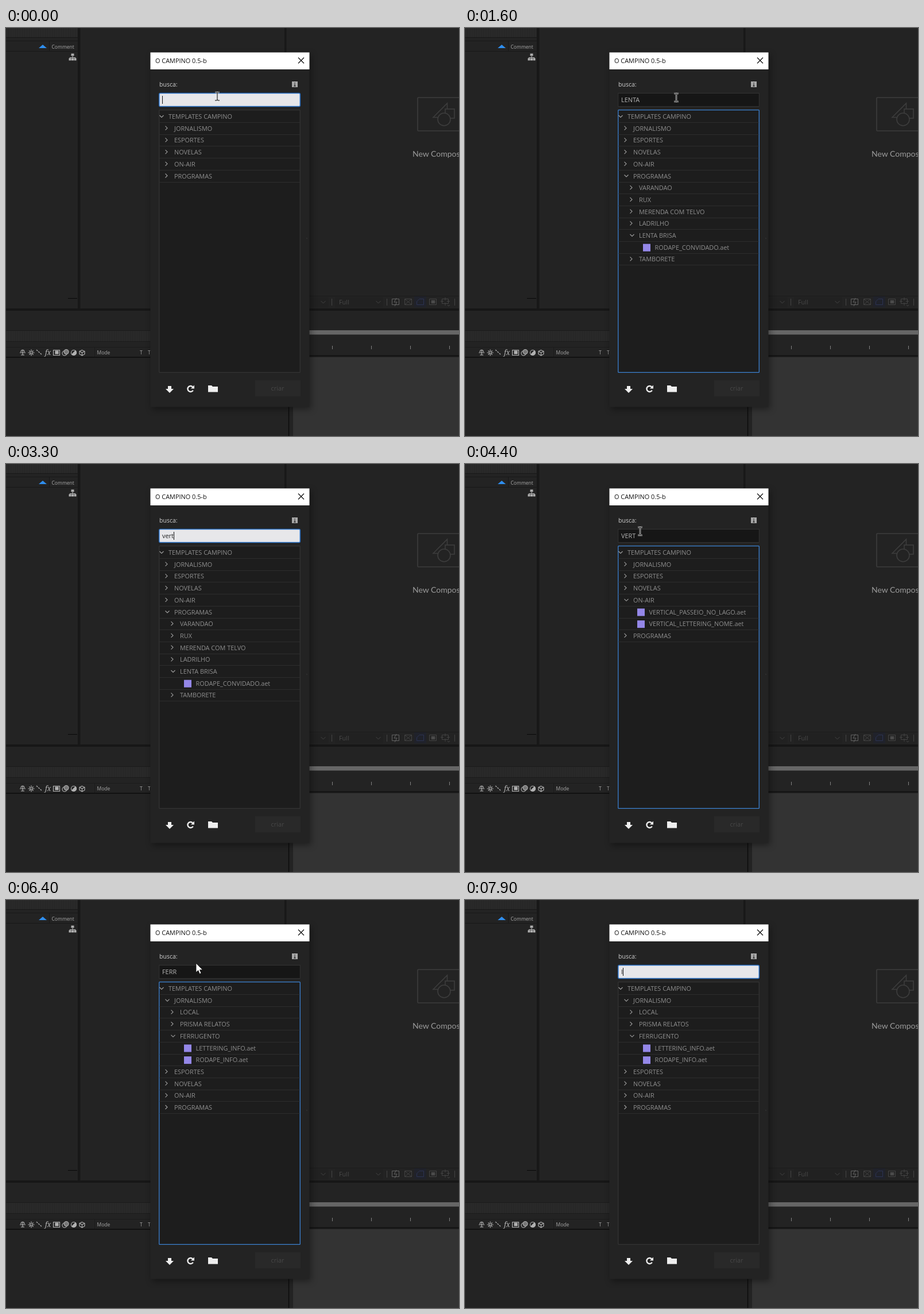
Animation of 789x710 px, one loop 8 s. Source, as an HTML page:

```html
<!DOCTYPE html>
<html lang="pt">
<head>
<meta charset="utf-8">
<title>Busca de templates</title>
<style>
  html, body { margin: 0; width: 100%; height: 100%; overflow: hidden; background: #232323; }
  svg { display: block; width: 789px; height: 710px; }
  text { font: 10.9px "Open Sans", "Noto Sans", sans-serif; white-space: pre; }
  .small { font-size: 8.5px; fill: #a8a8a8; }
  .line { fill: none; stroke: #b4b4b4; stroke-width: 1.15; }
  .dim { fill: none; stroke: #434343; }
  .ghost { fill: #232323; stroke: #3d3d3d; stroke-width: 1.6; }
  .dialog { filter: drop-shadow(3px 4px 6px rgba(0, 0, 0, .38)); }
  #rows text { fill: #8e8e8e; }
  #rows path { fill: none; stroke: #a0a0a0; stroke-width: 1.1; }
  #rows line { stroke: #2d2d2d; }
</style>
</head>
<body>
<svg viewBox="0 0 789 710">
  <defs>
    <pattern id="stripes" width="4" height="4" patternUnits="userSpaceOnUse">
      <rect width="4" height="4" fill="#292929"/><rect width="1" height="4" fill="#262626"/>
    </pattern>
    <path id="beam" d="M-4-7h3l1 1 1-1h3M0-6V6M-4 7h3l1-1 1 1h3"/>
  </defs>
  <rect width="789" height="710" fill="#232323"/>

  <!-- upper panels -->
  <rect width="125" height="16" fill="url(#stripes)"/>
  <path d="M0 16.5H125M0 22.5H125M0 40.5H125M75.5 23V40" stroke="#181818"/>
  <path d="M57 35L64 29L71 35Z" fill="#2f8eee"/>
  <text class="small" x="79.5" y="35.5">Comment</text>
  <path class="line" d="M116 49V52M111.5 53V51.5H120.5V53"/>
  <path d="M113.5 44.5h5v4h-5zM109.5 52.5h4v4h-4zM114 52.5h4v4h-4zM118.5 52.5h4v4h-4z" fill="#b0b0b0"/>
  <path d="M108 470.5H124" stroke="#080808"/>
  <rect x="125" width="4.5" height="488" fill="#181818"/>
  <rect x="485" width="3.5" height="488" fill="#181818"/>
  <rect y="488" width="789" height="4" fill="#171717"/>

  <!-- viewer placeholder and footer -->
  <g class="ghost">
    <rect x="717" y="121" width="90" height="58" rx="1"/>
    <path d="M744 155.5L768.5 131V155.5Z"/>
    <rect x="765" y="141" width="16" height="16"/>
    <circle cx="763" cy="159" r="11"/>
  </g>
  <text x="708" y="224" fill="#9a9a9a" style="font:14px Lato,sans-serif">New Composition</text>
  <path d="M529 466.5H789" stroke="#1b1b1b"/>
  <rect x="529" y="468" width="33" height="18" fill="#212121"/>
  <rect x="573" y="468" width="84" height="18" fill="#212121"/>
  <text x="580" y="481" fill="#484848">Full</text>
  <rect x="711" y="467" width="21" height="19" fill="#20222b"/>
  <g class="dim">
    <path d="M548.5 475l4 4 4-4M644.5 475l4 4 4-4M567.5 471v12M663.5 471v12M781.5 471v12"/>
    <path d="M672.5 471.5h12v10h-12zM680 470l-4 7h5l-4 7" stroke="#626262"/>
    <path d="M694.5 471.5h12v10h-12zM695 472l11 9M706 472l-11 9"/>
    <path d="M715.5 481.5V476L720 471.5H727.5V481.5Z" stroke="#2c3352"/>
    <path d="M737.5 471.5h12v10h-12z"/><path d="M741 474h6v5h-6z" fill="#4c4c4c"/>
    <path d="M759.5 471.5h11v8h-11zM757 475.5h5M768 475.5h5M765 469v5M765 478v5M769 482l2 2 2-2"/>
  </g>

  <!-- timeline -->
  <rect y="527" width="493" height="18" fill="url(#stripes)"/>
  <path d="M0 526.5H493M0 545.5H493M0 555.5H493M154.5 556V573" stroke="#1b1b1b"/>
  <path d="M0 573H493" stroke="#121212" stroke-width="2"/>
  <g class="line">
    <path d="M24 565h10M26 564c0-5 6-5 6 0M29 560v9M26 569h6"/>
    <circle cx="44" cy="565" r="2"/>
    <path d="M44 559.5v2.5M44 568v2.5M38.5 565h2.5M47 565h2.5M40.5 561.5l1.5 1.5M46 567l1.5 1.5M47.5 561.5l-1.5 1.5M42 567l-1.5 1.5"/>
    <path d="M53 560l10 9" stroke-dasharray="3 1.5"/>
    <path d="M82.5 560.5h11v9h-11z"/><path d="M86 562h5v5h-5z" fill="#b0b0b0"/>
    <circle cx="102" cy="566" r="4"/><circle cx="105" cy="563.5" r="4" fill="#777"/>
    <circle cx="118" cy="565" r="4.5"/><path d="M121 561.5a4.5 4.5 0 0 1-6.3 6.5z" fill="#b0b0b0"/>
    <path d="M132.5 560.5l4.5 2v5l-4.5 2.5-4.5-2.5v-5zM128 562.5l4.5 2.5 4.5-2.5M132.5 565v5"/>
  </g>
  <text x="68" y="569" fill="#b8b8b8" style="font:italic 12px 'Noto Serif',serif">fx</text>
  <text class="small" x="158.5" y="568">Mode</text>
  <text class="small" x="233" y="568">T</text><text class="small" x="247" y="568">T</text>
  <rect x="500" y="573" width="289" height="137" fill="#333"/>
  <path d="M492.5 492V710" stroke="#0c0c0c" stroke-width="1.5"/>
  <rect x="500" y="526" width="289" height="7.5" fill="#666"/>
  <path d="M500 570.5H789" stroke="#121212" stroke-width="2"/>
  <path d="M568.5 553v6M636.5 553v6M704.5 553v6M772.5 553v6" stroke="#808080"/>

  <!-- dialog -->
  <rect class="dialog" x="251.5" y="42.5" width="277" height="617" fill="#232323"/>
  <rect x="251.5" y="42.5" width="277" height="29.5" fill="#fff"/>
  <text x="260" y="61" fill="#111">O CAMPINO 0.5-b</text>
  <path d="M509 51.5l10 10M519 51.5l-10 10" stroke="#111" stroke-width="1.2"/>
  <text x="267" y="101.5" fill="#d0d0d0" style="font-size:10.5px">busca:</text>
  <rect x="498" y="93" width="10" height="10" fill="#a8a8a8"/>
  <path d="M503 95v1.5M503 97.5v4M501.5 101.2h3" stroke="#222" stroke-width="1.3"/>
  <circle cx="524" cy="366" r=".7" fill="#444"/>

  <rect id="field" x="266.8" y="113.5" width="245.5" height="23"/>
  <rect id="pick" x="272" y="118" height="14" fill="#2f70c4"/>
  <text id="query" x="272" y="129"></text>
  <rect id="caret" y="118" width="1" height="14" fill="#111"/>
  <rect id="tree" x="266.8" y="142.6" width="245.5" height="456.8" rx="1" fill="#1d1d1d" stroke-width="1.3"/>
  <g id="rows"></g>

  <path d="M282 623h6v5h4l-7 7-7-7h4z" fill="#eee"/>
  <path d="M325.5 625a5 5 0 1 0 .3 5.5" fill="none" stroke="#eee" stroke-width="2.4"/>
  <path d="M328 621.5v6h-6z" fill="#eee"/>
  <path d="M352 622h6l2 2h9v9.5h-17z" fill="#eee"/>
  <rect x="434" y="613" width="79" height="28" fill="#292929"/>
  <text x="461.5" y="631" fill="#484848">criar</text>

  <g id="ibeam" fill="none">
    <use href="#beam" stroke="#d8d8d8" stroke-width="2.6"/>
    <use href="#beam" stroke="#111"/>
  </g>
  <path id="arrow" d="M0 0V16L3.8 12.5L6.3 18.5L9 17.4L6.5 11.6H11.5Z" fill="#fff" stroke="#111" stroke-width=".8"/>
</svg>
<script>
const LOOP = 8000, STEP = 100, ROW = 20.7;
const el = id => document.getElementById(id);
const show = (node, on) => node.style.display = on ? '' : 'none';

// Row marks: "-" open folder, "+" closed folder, "*" file
const groups = ['JORNALISMO', 'ESPORTES', 'NOVELAS', 'ON-AIR', 'PROGRAMAS'];
const buildTree = (opened, children = []) => [
  [0, '-', 'TEMPLATES CAMPINO'],
  ...groups.flatMap(name => name === opened
    ? [[1, '-', name], ...children]
    : [[1, '+', name]])
];
const trees = {
  empty: [],
  closed: buildTree(),
  shows: buildTree('PROGRAMAS', [
    [2, '+', 'VARANDAO'], [2, '+', 'RUX'], [2, '+', 'MERENDA COM TELVO'],
    [2, '+', 'LADRILHO'], [2, '-', 'LENTA BRISA'],
    [3, '*', 'RODAPE_CONVIDADO.aet'], [2, '+', 'TAMBORETE']
  ]),
  onAir: buildTree('ON-AIR', [
    [2, '*', 'VERTICAL_PASSEIO_NO_LAGO.aet'], [2, '*', 'VERTICAL_LETTERING_NOME.aet']
  ]),
  news: buildTree('JORNALISMO', [
    [2, '+', 'LOCAL'], [2, '+', 'PRISMA RELATOS'], [2, '-', 'FERRUGENTO'],
    [3, '*', 'LETTERING_INFO.aet'], [3, '*', 'RODAPE_INFO.aet']
  ])
};

const treeSteps = [
  [0, 'closed'], [1100, 'empty'], [1400, 'shows'], [3500, 'empty'],
  [3700, 'onAir'], [6100, 'empty'], [6400, 'news']
];
const fieldSteps = [
  [0, '', 'on'], [100, 'l', 'on'], [200, 'l', 'off'], [400, 'l', 'on'], [500, 'l', 'off'],
  [600, 'l', 'on'], [800, 'len', 'on'], [900, 'lenta', 'on'], [1100, 'LENTA', 'idle'],
  [2000, 'LENTA', 'on'], [2100, 'LENTA', 'picked'], [2500, '', 'on'], [2700, '', 'off'],
  [2900, '', 'on'], [3100, 'v', 'on'], [3200, 'ver', 'on'], [3300, 'vert', 'on'],
  [3400, 'vert', 'off'], [3500, 'VERT', 'idle'], [4500, 'VERT', 'on'], [4600, 'VERT', 'picked'],
  [5000, '', 'on'], [5200, '', 'off'], [5400, 'f', 'on'], [5500, 'fe', 'on'], [5600, 'fer', 'on'],
  [5700, 'ferr', 'on'], [5800, 'ferr', 'off'], [5900, 'ferr', 'on'], [6100, 'FERR', 'idle'],
  [7200, 'FERR', 'on'], [7300, 'FERR', 'picked'], [7900, 'l', 'on']
];
// A step without a position hides the pointer
const pointerSteps = [
  [0, 368, 119], [100], [1400, 368, 119], [1600, 368, 121], [1900, 345, 122], [2000, 306, 124],
  [2100, 280, 123], [2200, 257, 118], [2300, 262, 109], [2400, 290, 124], [2500],
  [3700, 290, 124], [4100, 298, 122], [4300, 304, 118], [4400, 305, 117], [4500, 303, 122],
  [4600, 280, 122], [4700, 263, 108], [4800, 290, 98], [4900, 331, 110], [5000],
  [5900, 331, 110], [7000, 325, 118], [7100, 310, 124], [7300, 285, 124], [7400, 264, 122],
  [7600, 290, 118], [7700, 312, 109], [7900]
];
const at = (steps, time) => steps.findLast(step => step[0] <= time);

function rowMarkup([level, mark, name], index) {
  const y = 154 + index * ROW, x = 10 * level;
  const icon = mark === '*'
    ? `<rect x="${280 + x}" y="${y - 6}" width="13" height="13" fill="#9487e8"/>`
    : mark === '-'
      ? `<path d="M${267.5 + x} ${y - 2}l3.5 3.5 3.5-3.5"/>`
      : `<path d="M${267.5 + x} ${y - 4}l3.5 3.5-3.5 3.5"/>`;
  const line = Math.round(y + 10) + .5;
  return `${icon}<text x="${(mark === '*' ? 300.5 : 283) + x}" y="${y + 4}">${name}</text>
    <line x1="267" x2="512" y1="${line}" y2="${line}"/>`;
}

let shownTree;
function drawTree(name, focused) {
  el('tree').setAttribute('stroke', focused ? '#3c82d2' : '#343434');
  if (name === shownTree) return;
  shownTree = name;
  el('rows').innerHTML = trees[name].map(rowMarkup).join('');
}

function drawField(text, mode) {
  const idle = mode === 'idle', picked = mode === 'picked';
  const field = el('field'), query = el('query');
  field.setAttribute('fill', idle ? '#161616' : '#e7e7ea');
  field.setAttribute('stroke', idle ? '#333' : '#2b71c4');
  field.setAttribute('stroke-width', idle ? 1 : 1.6);
  field.setAttribute('rx', idle ? 0 : 2);
  query.textContent = text;
  query.setAttribute('fill', idle ? '#b4b4b4' : picked ? '#fff' : '#222');
  const width = text ? query.getComputedTextLength() : 0;
  el('caret').setAttribute('x', Math.round(272 + width));
  el('pick').setAttribute('width', width);
  show(el('caret'), mode === 'on');
  show(el('pick'), picked);
}

function drawPointer(x, y) {
  const visible = x !== undefined, inField = x > 266 && y > 112;
  show(el('ibeam'), visible && inField);
  show(el('arrow'), visible && !inField);
  if (visible) el(inField ? 'ibeam' : 'arrow').setAttribute('transform', `translate(${x} ${y})`);
}

let lastTick = -1;
const start = performance.now();
function render() {
  const tick = Math.floor((performance.now() - start) % LOOP / STEP);
  if (tick !== lastTick) {
    lastTick = tick;
    const time = tick * STEP;
    const [, tree] = at(treeSteps, time);
    const [, text, mode] = at(fieldSteps, time);
    const [, x, y] = at(pointerSteps, time);
    drawTree(tree, mode === 'idle' && tree !== 'empty');
    drawField(text, mode);
    drawPointer(x, y);
  }
  requestAnimationFrame(render);
}
render();
</script>
</body>
</html>
```
